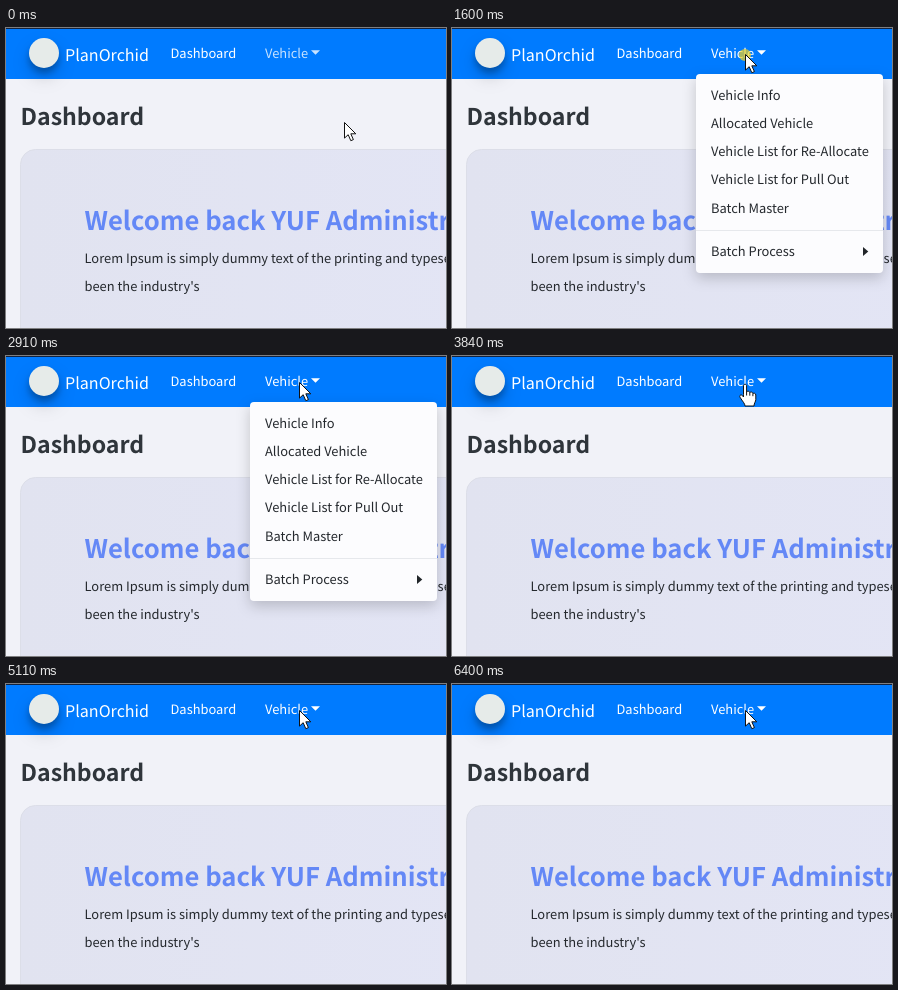
An HTML page that plays this animation: 440x300 px, repeating every 6420 ms.

```html
<!DOCTYPE html>
<html lang="en">
<head>
<meta charset="utf-8">
<title>Dashboard menu</title>
<style>
  html, body { margin: 0; width: 100%; height: 100%; overflow: hidden; background: #f1f2f8; }
  svg { display: block; }
  text {
    font: 12.9px "Noto Sans CJK JP", "Noto Sans CJK SC", "Noto Sans CJK", "Noto Sans", sans-serif;
    text-rendering: geometricPrecision;
    fill: #24282d;
  }
  .nav text { fill: #fff; }
  .nav .brand { font-size: 16.1px; }
  .title { font-size: 23.1px; font-weight: 700; fill: #2f353b; }
  .welcome { font-size: 25.65px; font-weight: 700; fill: #6488f6; }
  .logo { filter: drop-shadow(0 5px 3px rgba(0, 0, 0, .23)) drop-shadow(0 8px 8px rgba(0, 0, 0, .17)); }
  .panel { filter: drop-shadow(0 5px 7px rgba(0, 0, 0, .19)); }
</style>
</head>
<body>
<svg width="440" height="300" viewBox="0 0 440 300">
  <defs>
    <linearGradient id="cardFill" x1="0" y1="0" x2="1" y2="0">
      <stop offset="0" stop-color="#e1e3f0"/>
      <stop offset="1" stop-color="#e3e5f5"/>
    </linearGradient>
  </defs>
  <rect width="440" height="300" fill="#f1f2f8"/>

  <rect x="14.5" y="121.5" width="470" height="230" rx="15" fill="url(#cardFill)" stroke="#dcdee8"/>
  <text class="title" x="14.5" y="97">Dashboard</text>
  <text class="welcome" x="78.5" y="202">Welcome back YUF Administrator</text>
  <text x="78.5" y="235">Lorem Ipsum is simply dummy text of the printing and typesetting</text>
  <text x="78.5" y="263">been the industry's</text>

  <g class="nav">
    <rect width="440" height="51" fill="#007bff"/>
    <rect width="440" height="1" fill="#12233f"/>
    <circle class="logo" cx="38" cy="25" r="15" fill="#e6ebe9"/>
    <text class="brand" x="59" y="33">PlanOrchid</text>
    <text x="164.5" y="30">Dashboard</text>
    <g id="link">
      <text x="259" y="30">Vehicle</text>
      <path d="M305 22.3h9l-4.5 4.4z" fill="#fff"/>
    </g>
  </g>

  <g id="menu">
    <rect class="panel" x="244" y="46" width="187" height="199" rx="4" fill="#fcfcfe"/>
    <path d="M244 202.5h187" stroke="#e6e8ec"/>
    <path d="M411 219l5.3 4.5-5.3 4.5z" fill="#212529"/>
  </g>

  <circle id="flash" fill="#f5d21c"/>
  <g id="cursor" stroke="#111" stroke-linejoin="round">
    <path id="arrow" fill="#fff" d="M.5.5v15.6l3.7-3.4 2.6 6 2.6-1.1-2.6-5.8h5z"/>
    <path id="hand" fill="#fff" d="M-1.5 10.5V1.8C-1.5-.2 1.6-.2 1.6 1.8V8C2.2 6.8 4.7 7 4.8 8.7 5.5 7.6 7.8 7.9 7.9 9.6
      8.8 8.7 10.8 9.3 10.8 11V15.5C10.8 17.7 9 19 9 22H0C0 19.5-2.5 17.5-5 13.2-6 11.3-3.7 10.1-2.5 11.7L-1.5 13z
      M1.6 8v3.5M4.8 8.7v3M7.9 9.6v2.6"/>
  </g>
</svg>
<script>
const LOOP = 6420, OPEN = 1480, CLOSE = 3120, REST = 4300;
const el = id => document.getElementById(id);
const [link, menu, flash, cursor, arrow, hand] =
  ["link", "menu", "flash", "cursor", "arrow", "hand"].map(el);

[["Vehicle Info", 72], ["Allocated Vehicle", 100], ["Vehicle List for Re-Allocate", 128],
 ["Vehicle List for Pull Out", 156], ["Batch Master", 185], ["Batch Process", 228]]
  .forEach(([label, y]) => {
    const item = document.createElementNS("http://www.w3.org/2000/svg", "text");
    item.setAttribute("x", 259);
    item.setAttribute("y", y);
    item.textContent = label;
    menu.append(item);
  });

const clamp = v => Math.min(1, Math.max(0, v));
const ease = v => v * v * (3 - 2 * v);
const show = (node, on) => node.style.display = on ? "" : "none";

function draw(now) {
  const t = now % LOOP;
  const p = ease(clamp((t - 60) / 560));
  const x = 338 + (293 - 338) * p, y = 94 + (26 - 94) * p;
  const pointing = y < 42 && t < OPEN || t >= CLOSE && t < REST;
  cursor.setAttribute("transform", `translate(${x} ${y})`);
  // The hand's fingertip sits slightly below the arrow tip.
  hand.setAttribute("transform", "translate(0 2)");
  show(arrow, !pointing);
  show(hand, pointing);

  show(menu, t >= OPEN && t < CLOSE);
  link.setAttribute("opacity", t < OPEN ? .78 : 1);

  const age = t - (t < CLOSE ? OPEN : CLOSE);
  const shown = age >= 0 && age < 240;
  show(flash, shown);
  if (shown) {
    flash.setAttribute("cx", x);
    flash.setAttribute("cy", y + 1);
    flash.setAttribute("r", 9 - age / 40);
    flash.setAttribute("opacity", 1 - age / 400);
  }
}

function tick() {
  draw(performance.now());
  requestAnimationFrame(tick);
}
tick();
</script>
</body>
</html>
```
